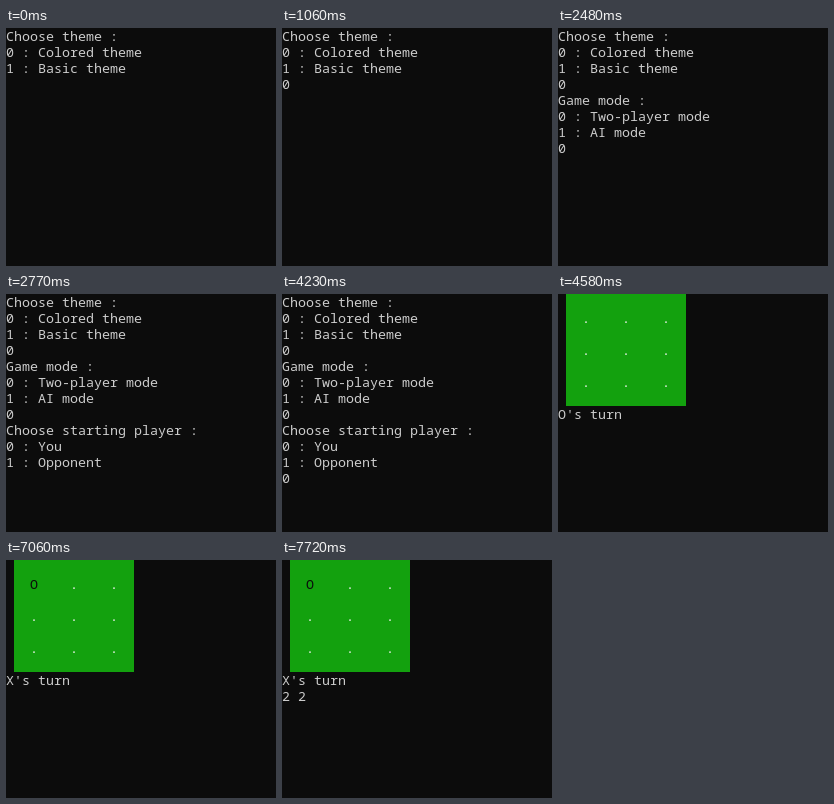
Write an HTML page with a canvas that moves like this. It is 270x238 px and loops after 8000 ms.

```html
<!DOCTYPE html>
<html lang="en">
<head>
<meta charset="utf-8">
<title>Console tic-tac-toe</title>
<style>
  html, body { margin: 0; width: 100%; height: 100%; overflow: hidden; background: #0c0c0c; }
  canvas { display: block; }
</style>
</head>
<body>
<canvas id="screen" width="270" height="238"></canvas>
<script>
const LOOP = 8000, CELL_W = 8, CELL_H = 16, BASELINE = 13;
const BLACK = '#0c0c0c', GREEN = '#13a10e', GRAY = '#cccccc', WHITE = '#f2f2f2';
const ctx = document.getElementById('screen').getContext('2d', { alpha: false });

// Menu lines and the time each one appears
const menu = [
  [0, 'Choose theme :'], [0, '0 : Colored theme'], [0, '1 : Basic theme'], [1060, '0'],
  [1370, 'Game mode :'], [1370, '0 : Two-player mode'], [1370, '1 : AI mode'], [2480, '0'],
  [2770, 'Choose starting player :'], [2770, '0 : You'], [2770, '1 : Opponent'], [4230, '0'],
];
const BOARD_AT = 4580, MOVE_AT = 7060;

// One character per console cell
function print(text, col, row, color = GRAY) {
  ctx.fillStyle = color;
  [...text].forEach((ch, i) =>
    ctx.fillText(ch, (col + i) * CELL_W, row * CELL_H + BASELINE));
}

function typed(t, first, second, text) {
  return t < first ? '' : t < second ? text[0] : text;
}

function drawBoard(t) {
  const moved = t >= MOVE_AT;
  ctx.fillStyle = GREEN;
  ctx.fillRect(CELL_W, 0, 15 * CELL_W, 7 * CELL_H);
  for (let y = 0; y < 3; y++) {
    for (let x = 0; x < 3; x++) {
      const taken = moved && x + y === 0;
      print(taken ? 'O' : '.', 3 + 5 * x, 1 + 2 * y, taken ? BLACK : WHITE);
    }
  }
  print(moved ? "X's turn" : "O's turn", 0, 7);
  print(moved ? typed(t, 7510, 7720, '2 2') : typed(t, 5590, 5840, '1 1'), 0, 8);
}

function frame() {
  const t = performance.now() % LOOP;
  ctx.fillStyle = BLACK;
  ctx.fillRect(0, 0, 270, 238);
  ctx.font = '13.333px "Noto Sans Mono", monospace';
  if (t >= BOARD_AT) drawBoard(t);
  else menu.forEach(([at, text], row) => { if (t >= at) print(text, 0, row); });
  requestAnimationFrame(frame);
}
frame();
</script>
</body>
</html>
```
